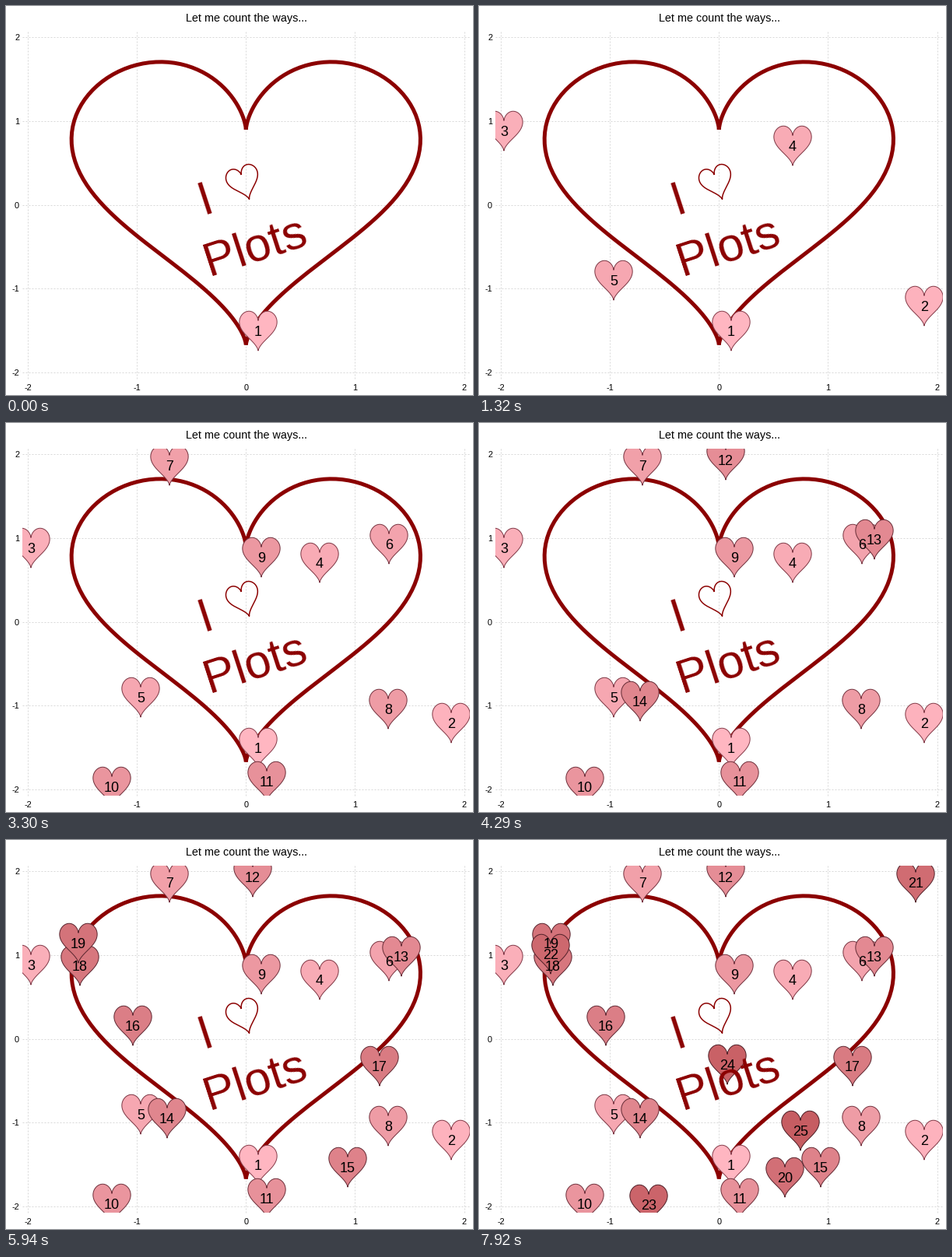
A matplotlib script that plays this animation: 600x500 px, repeating every 8000 ms.

```python
import numpy as np
import matplotlib.pyplot as plt
from matplotlib.animation import FuncAnimation
from matplotlib.patches import Polygon, Rectangle

W, H, DPI = 600, 500, 100
LOOP, STEP, TICK = 8000, 330, 40    # ms
PT = 72 / DPI                       # points per pixel
X0, Y0, UX, UY = 308.3, 255.5, 140.1, 107.75
LEFT, TOP, RIGHT, BOTTOM = 20.5, 32.5, 596, 479
DARKRED, PINK = (139, 0, 0), (255, 182, 193)
EDGE, DARK_EDGE = (135, 62, 76), (15, 0, 0)
TILT = 18

# where each counted heart lands, in pixels
SPOTS = [(324, 418), (572, 386), (32, 161), (403, 180), (173, 353),
         (492, 156), (210, 55), (491, 368), (328, 173), (136, 468),
         (335, 461), (317, 48), (508, 150), (207, 358), (439, 421),
         (163, 239), (480, 291), (95, 162), (93, 133), (393, 434),
         (561, 55), (92, 147), (218, 469), (319, 289), (413, 374)]

plt.rcParams["font.family"] = "Liberation Sans"
fig = plt.figure(figsize=(W / DPI, H / DPI), dpi=DPI, facecolor="white")
ax = fig.add_axes([0, 0, 1, 1])
ax.set_xlim(0, W)
ax.set_ylim(H, 0)
ax.axis("off")
frame = Rectangle((LEFT, TOP), RIGHT - LEFT, BOTTOM - TOP,
                  transform=ax.transData)


def blend(a, b, mix):
    return (np.array(a) * (1 - mix) + np.array(b) * mix) / 255


def heart_curve(n=200):
    """Classic heart curve, 3.2 wide, starting and ending at the tip."""
    t = np.linspace(-np.pi, np.pi, n)
    y = 13 * np.cos(t) - 5 * np.cos(2 * t) - 2 * np.cos(3 * t) - np.cos(4 * t)
    return 1.6 * np.sin(t) ** 3, 0.1167 * y + 0.313


def add_heart(x, y, sx, sy, face, edge, width, z, tilt=0):
    u, v = heart_curve()
    u, v, a = u * sx, v * sy, np.radians(tilt)
    pts = np.column_stack([x + u * np.cos(a) - v * np.sin(a),
                           y - u * np.sin(a) - v * np.cos(a)])
    patch = Polygon(pts, closed=False, facecolor=face, edgecolor=edge,
                    lw=width * PT, joinstyle="miter", capstyle="butt",
                    zorder=z)
    ax.add_patch(patch)
    patch.set_clip_path(frame)
    return patch


def write(x, y, s, size, color="black", ha="center", z=5, **kw):
    return ax.text(x, y, s, fontsize=size * PT, color=color, ha=ha,
                   va="baseline", zorder=z, **kw)


# grid, tick labels, title
grid = dict(color="#d9d9d9", lw=PT, ls=(0, (2, 2)), zorder=0)
for n in range(-2, 3):
    gx, gy = X0 + n * UX, Y0 - n * UY
    ax.plot([gx, gx], [TOP, BOTTOM], **grid)
    ax.plot([LEFT, RIGHT], [gy, gy], **grid)
    write(gx, 493.5, str(n), 11)
    write(17, gy + 4, str(n), 11, ha="right")
write(309, 20, "Let me count the ways...", 14.4)

# large outline and tilted message
red = blend(DARKRED, DARKRED, 0)
add_heart(X0, Y0, UX, UY, "none", red, 5, 1)
tilted = dict(color=red, ha="left", z=6, rotation=TILT,
              rotation_mode="anchor")
write(253.5, 268, "I", 61, **tilted)
write(261, 346.5, "Plots", 61, **tilted)
add_heart(306, 228, 13, 12.9, "none", red, 1.5, 6, TILT)

# numbered hearts, darkening with each one
marks = []
for i, (x, y) in enumerate(SPOTS):
    mix = i / 49
    heart = add_heart(x, y, 15.1, 15.1, blend(PINK, DARKRED, mix),
                      blend(EDGE, DARK_EDGE, mix), 1, 2 + i / 100)
    label = write(x, y + 6.2, str(i + 1), 18, z=4)
    marks.append((heart, label))


def update(n):
    shown = 1 + (n * TICK + TICK - 1) // STEP
    for i, pair in enumerate(marks):
        for art in pair:
            art.set_visible(i < shown)
    return [art for pair in marks for art in pair]


anim = FuncAnimation(fig, update, frames=LOOP // TICK, interval=TICK,
                     init_func=lambda: update(0), repeat=True,
                     repeat_delay=0, blit=False)
plt.show()
```
